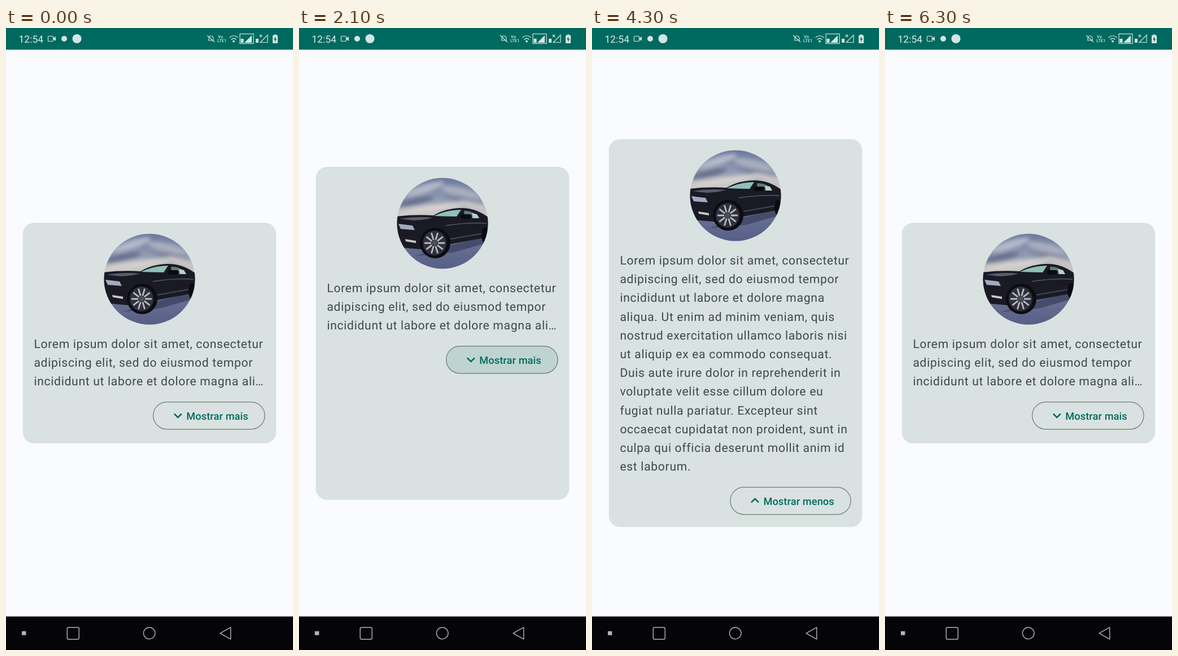
These frames come from a looping animation (508x1102 px, 6.4 s). An HTML page:

```html
<!DOCTYPE html>
<html lang="pt">
<head>
<meta charset="utf-8">
<title>Expandable card</title>
<style>
  html, body { margin: 0; width: 100%; height: 100%; overflow: hidden; background: #f9fbfd; }
  svg { display: block; width: 100%; height: 100%; }
  text { font-family: Roboto, sans-serif; white-space: pre; text-rendering: geometricPrecision; }
  .body { font-size: 21.17px; letter-spacing: .03125em; fill: #3f4947; }
  .label { font-size: 18.15px; font-weight: 500; letter-spacing: .0071em; fill: #006a60; }
  .line { fill: none; stroke: #d3e6e3; stroke-width: 1.2; }
  .solid { fill: #d3e6e3; }
  .tiny { font-size: 7.5px; font-weight: 500; fill: #d3e6e3; }
  .nav { fill: none; stroke: #b4b4b6; stroke-width: 1.4; stroke-linejoin: round; }
</style>
</head>
<body>
<svg viewBox="0 0 508 1102">
  <defs>
    <clipPath id="cardClip"><rect id="clipShape" x="29.6" width="448.8" rx="19.8"/></clipPath>
    <clipPath id="photoClip"><circle cx="254" cy="100" r="80.5"/></clipPath>
    <clipPath id="buttonClip"><rect id="buttonShape" height="49.4" rx="24.7"/></clipPath>
    <linearGradient id="sky" x2="0" y2="1">
      <stop offset="0" stop-color="#6a789c"/>
      <stop offset=".55" stop-color="#929cb4"/>
      <stop offset="1" stop-color="#d5d1cb"/>
    </linearGradient>
    <linearGradient id="snow" x2="0" y2="1">
      <stop offset="0" stop-color="#7c829f"/>
      <stop offset="1" stop-color="#555e86"/>
    </linearGradient>
    <filter id="soft" x="-30%" y="-50%" width="160%" height="200%"><feGaussianBlur stdDeviation="3.5"/></filter>
  </defs>

  <rect width="508" height="1102" fill="#f9fbfd"/>

  <g id="card" clip-path="url(#cardClip)">
    <rect id="cardShape" x="29.6" width="448.8" rx="19.8" fill="#d9e2e0"/>
    <g clip-path="url(#photoClip)">
      <rect x="173" y="19" width="162" height="72" fill="url(#sky)"/>
      <g filter="url(#soft)">
        <ellipse cx="222" cy="39" rx="36" ry="7" fill="#b4bac9" transform="rotate(-18 222 39)"/>
        <ellipse cx="286" cy="45" rx="36" ry="8" fill="#a9aebe" transform="rotate(14 286 45)"/>
        <ellipse cx="205" cy="61" rx="34" ry="6" fill="#68718d" transform="rotate(-12 205 61)"/>
        <ellipse cx="290" cy="58" rx="36" ry="5" fill="#7d859c" transform="rotate(12 290 58)"/>
        <ellipse cx="235" cy="74" rx="60" ry="6" fill="#d6d2cd" transform="rotate(-8 235 74)"/>
        <ellipse cx="312" cy="70" rx="30" ry="6" fill="#c9c6c6" transform="rotate(16 312 70)"/>
      </g>
      <rect x="173" y="88" width="162" height="95" fill="url(#snow)"/>
      <path d="M205 158 L268 139 L335 122 V134 L272 152Z" fill="#454b6a"/>
      <path d="M170 88 Q205 84 238 86 Q258 74 285 73 Q312 72 336 90 V124 L268 137 L215 146 L170 142Z" fill="#191a23"/>
      <path d="M239 87 Q258 77 287 76 L279 88Z" fill="#8fc0b9"/>
      <path d="M292 78 Q309 77 319 91 L293 91Z" fill="#5f7d7c"/>
      <path d="M306 82 L315 84 L319 91 L308 91Z" fill="#b9d1cd"/>
      <rect x="286" y="84" width="20" height="8" rx="4" fill="#0b0b12"/>
      <path d="M178 92 Q208 87 237 90 Q224 94 203 95Z" fill="#5a5d6c"/>
      <path d="M176 101 L201 104 L205 112 L180 110Z" fill="#a4a9c4"/>
      <path d="M188 128 L207 131 V135 L189 132Z" fill="#cbc9c4"/>
      <path d="M260 104 Q300 98 332 100" fill="none" stroke="#565868" stroke-width="1.4"/>
      <path d="M268 128 L330 117" fill="none" stroke="#50526a" stroke-width="1.4"/>
      <ellipse cx="329" cy="121" rx="6" ry="14" fill="#0b0b11"/>
      <circle cx="241" cy="135" r="27" fill="#0c0c12"/>
      <ellipse cx="240" cy="135" rx="21" ry="22" fill="#30303c"/>
      <g id="spokes" stroke="#b9bac4" stroke-width="2.8"/>
      <circle cx="240" cy="135" r="5" fill="#4d4e5a"/>
    </g>
    <g id="copy"></g>
    <g id="button">
      <g clip-path="url(#buttonClip)"><circle id="ripple" cy="24.7" fill="#006a60"/></g>
      <rect id="outline" x=".6" y=".6" height="48.2" rx="24.1" fill="none" stroke="#6f7977" stroke-width="1.24"/>
      <path id="chevron" fill="none" stroke="#006a60" stroke-width="2.5"/>
      <text id="label" class="label" x="59.2" y="32.3"/>
    </g>
  </g>

  <rect width="508" height="38.4" fill="#006a60"/>
  <text x="22.5" y="26" font-size="17.5" fill="#d8ebe8">12:54</text>
  <rect class="line" x="74.5" y="14.5" width="9" height="9" rx="1"/>
  <path class="solid" d="M84 18 L88 15 V23 L84 20Z"/>
  <circle class="solid" cx="103" cy="19" r="5"/>
  <circle class="solid" cx="125.5" cy="19" r="8"/>

  <path class="line" d="M358 22 H367 V18 Q366 14 362.5 14 Q359 14 359 18 V22 M356 13 L369 25"/>
  <text class="tiny" x="375" y="18">Vo</text>
  <text class="tiny" x="374" y="25">LTE1</text>
  <path class="line" d="M395.5 17 Q403 10.5 410.5 17 M398.5 20.5 Q403 16.5 407.5 20.5"/>
  <path class="solid" d="M400.5 23 Q403 21 405.5 23 L403 26Z"/>
  <rect class="line" x="414" y="10.5" width="24" height="17"/>
  <path class="solid" d="M422 26 L435 13 V26Z"/>
  <rect class="solid" x="415.5" y="19" width="5" height="7"/>
  <rect class="solid" x="442" y="19" width="5" height="7"/>
  <path class="line" d="M450 25.5 L463 12.5 V25.5Z M449 12 L453 16 M453 12 L449 16"/>
  <path class="solid" d="M472 13 H474.5 V11.5 H478.5 V13 H481 V27 H472Z"/>
  <path d="M477 15 L474 20.5 H476 V25 L479 19 H477Z" fill="#006a60"/>

  <rect y="1042.6" width="508" height="59.4" fill="#050408"/>
  <rect x="28" y="1068.7" width="7.5" height="7" fill="#b4b4b6"/>
  <rect class="nav" x="108.3" y="1062" width="21" height="21" rx="2.5"/>
  <circle class="nav" cx="253.7" cy="1072.3" r="10.3"/>
  <path class="nav" d="M379 1072.3 L397.7 1061.8 V1082.8Z"/>
</svg>
<script>
const LOOP = 6400, STEP = 100;
const SHORT = 391, TALL = 690, CENTER = 540.5, LINE = 33.2;
const OMEGA = 10; // critically damped spring, rad/s
const TAPS = [
  { press: 580, click: 717 },
  { press: 1790, click: 1980 },
  { press: 3590, click: 3660 },
  { press: 5090, click: 5126 },
];
const LINES = [
  'Lorem ipsum dolor sit amet, consectetur',
  'adipiscing elit, sed do eiusmod tempor',
  'incididunt ut labore et dolore magna',
  'aliqua. Ut enim ad minim veniam, quis',
  'nostrud exercitation ullamco laboris nisi',
  'ut aliquip ex ea commodo consequat.',
  'Duis aute irure dolor in reprehenderit in',
  'voluptate velit esse cillum dolore eu',
  'fugiat nulla pariatur. Excepteur sint',
  'occaecat cupidatat non proident, sunt in',
  'culpa qui officia deserunt mollit anim id',
  'est laborum.',
];

const $ = id => document.getElementById(id);
const set = (el, attrs) => { for (const key in attrs) el.setAttribute(key, attrs[key]); return el; };
const add = (parent, tag, attrs) =>
  parent.appendChild(set(document.createElementNS('http://www.w3.org/2000/svg', tag), attrs));
const clamp = v => Math.min(1, Math.max(0, v));

const rows = LINES.map((line, i) => {
  const row = add($('copy'), 'text', { class: 'body', x: 49.4, y: 222 + i * LINE });
  row.textContent = line;
  return row;
});

for (let i = 0; i < 10; i++) {
  const a = i * Math.PI / 5;
  add($('spokes'), 'line', {
    x1: 240 + 6 * Math.cos(a), y1: 135 + 6 * Math.sin(a),
    x2: 240 + 18 * Math.cos(a), y2: 135 + 19 * Math.sin(a),
  });
}

function setContent(open) {
  rows.forEach((row, i) => row.style.display = open || i < 3 ? '' : 'none');
  rows[2].textContent = LINES[2] + (open ? '' : ' ali…');
  const left = open ? 244.2 : 260;
  const width = 458.6 - left;
  set($('button'), { transform: `translate(${left} ${open ? 616 : 317})` });
  set($('buttonShape'), { width });
  set($('outline'), { width: width - 1.2 });
  set($('ripple'), { cx: width / 2 });
  set($('chevron'), { d: open ? 'M37.8 27.5 L44.3 21 L50.8 27.5' : 'M37.8 21.5 L44.3 28 L50.8 21.5' });
  $('label').textContent = open ? 'Mostrar menos' : 'Mostrar mais';
}

function setRipple(time) {
  const tap = TAPS.filter(t => t.press <= time).pop();
  if (!tap) return set($('ripple'), { opacity: 0 });
  const age = time - tap.press;
  const grow = 1 - (1 - clamp(age / 225)) ** 3;
  const fade = clamp((time - tap.click - 225) / 150);
  set($('ripple'), { r: 30 + 85 * grow, opacity: .12 * clamp(age / 75) * (1 - fade) });
}

let wasOpen = null;
function draw(time) {
  const done = TAPS.filter(t => t.click <= time);
  const open = done.length % 2 === 1;
  const since = done.length ? time - done[done.length - 1].click : LOOP;
  const u = OMEGA * since / 1000;
  const rest = (1 + u) * Math.exp(-u);
  const exact = open ? TALL - (TALL - SHORT) * rest : SHORT + (TALL - SHORT) * rest;
  const height = Math.ceil(exact - .06);
  if (open !== wasOpen) setContent(wasOpen = open);
  set($('card'), { transform: `translate(0 ${Math.ceil(CENTER - height / 2)})` });
  set($('cardShape'), { height });
  set($('clipShape'), { height });
  setRipple(time);
}

const start = performance.now();
function tick() {
  const time = (performance.now() - start) % LOOP;
  draw(Math.floor(time / STEP) * STEP);
  requestAnimationFrame(tick);
}
tick();
</script>
</body>
</html>
```
